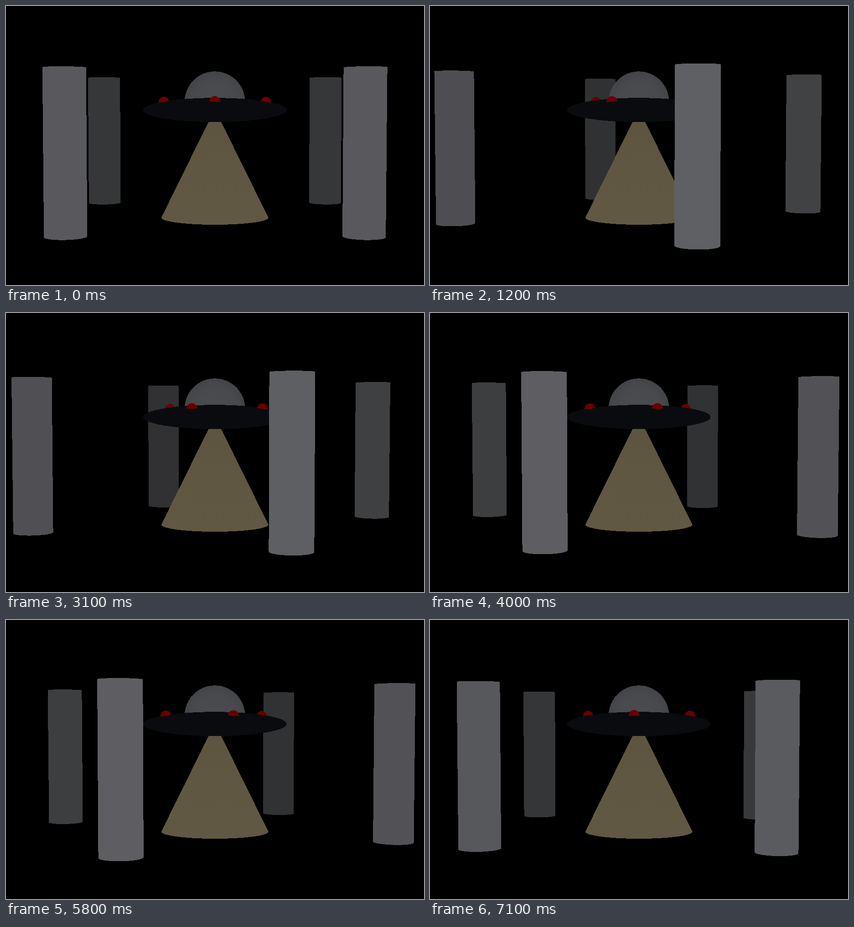
Animation, 917 px wide and 611 px high, one loop 7200 ms. Source, as an HTML page:

```html
<!DOCTYPE html>
<html lang="en">
<head>
<meta charset="utf-8">
<title>Saucer among pillars</title>
<style>
html, body { margin: 0; width: 100%; height: 100%; overflow: hidden; background: #000; }
svg { display: block; width: 100vw; height: 100vh; }
</style>
</head>
<body>
<svg viewBox="0 0 917 611" shape-rendering="crispEdges">
  <defs>
    <radialGradient id="glass" gradientUnits="userSpaceOnUse" cx="458.2" cy="209.7" r="66.4">
      <stop offset="0" stop-color="#4b4c4f"/>
      <stop offset=".75" stop-color="#48494c"/>
      <stop offset="1" stop-color="#434447"/>
    </radialGradient>
    <linearGradient id="light" x1="0" y1="0" x2="0" y2="1">
      <stop offset="0" stop-color="#5c543f"/>
      <stop offset=".5" stop-color="#5f5742"/>
      <stop offset="1" stop-color="#605842"/>
    </linearGradient>
  </defs>
  <rect width="917" height="611" fill="#000"/>
  <g id="farPillars"></g>
  <g id="farLamps" fill="#680000"></g>
  <path d="M391.8 209.7A66.4 66.4 0 0 1 524.6 209.7Z" fill="url(#glass)"/>
  <path d="M458.2 226L575.7 463.5A117.5 15.5 0 0 1 340.7 463.5Z" fill="url(#light)"/>
  <ellipse cx="458.2" cy="227.7" rx="157.5" ry="26.5" fill="#0a0b0f"/>
  <g id="nearLamps" fill="#680000"></g>
  <g id="nearPillars"></g>
</svg>
<script>
const LOOP = 7200, STEP = 100, RAD = Math.PI / 180;
const CX = 458.2, CY = 305.5, FOCAL = 1842.6, DIST = 1842.6, TILT = 0.04586;
const HORIZON = CY - FOCAL * TILT;
const PILLAR = { orbit: 395.3, r: 40, top: 73.2, bottom: -242.3 };
const LAMP = { orbit: 112, r: 11.3, y: 11 };

const layer = id => document.getElementById(id);
const [farPillars, farLamps, nearLamps, nearPillars] =
  ['farPillars', 'farLamps', 'nearLamps', 'nearPillars'].map(layer);
const makePaths = () => Array.from({ length: 4 }, () =>
  document.createElementNS('http://www.w3.org/2000/svg', 'path'));
const pillars = makePaths(), lamps = makePaths();

// y is the height above the eye, z points towards the viewer
function project(x, y, z) {
  const d = DIST - z, k = y / d;
  const scale = FOCAL / (d * (1 - k * TILT));
  return [CX + x * scale, CY - FOCAL * (k + TILT) / (1 - k * TILT)];
}

function pillarPath(x, z) {
  const { r, top, bottom } = PILLAR, n = 24;
  const facing = Math.atan2(-x, DIST - z);
  const half = Math.acos(r / Math.hypot(x, DIST - z));
  const rim = (y, dir) => Array.from({ length: n + 1 }, (_, i) => {
    const a = facing + dir * half * (2 * i / n - 1);
    const [px, py] = project(x + r * Math.sin(a), y, z + r * Math.cos(a));
    return px.toFixed(2) + ' ' + py.toFixed(2);
  });
  return 'M' + [...rim(top, 1), ...rim(bottom, -1)].join('L') + 'Z';
}

function pillarColor(z) {
  const v = 95 - 0.0616 * (382 - z);
  return `rgb(${[v, v + 0.7, v + 2 + (v - 48) * 0.06].map(Math.round)})`;
}

function drawPillars(turn) {
  pillars
    .map((el, i) => {
      const a = turn + (45 + 90 * i) * RAD;
      return { el, x: PILLAR.orbit * Math.sin(a), z: PILLAR.orbit * Math.cos(a) };
    })
    .sort((p, q) => p.z - q.z)
    .forEach(({ el, x, z }) => {
      el.setAttribute('d', pillarPath(x, z));
      el.setAttribute('fill', pillarColor(z));
      (z < 0 ? farPillars : nearPillars).append(el);
    });
}

function drawLamps(turn) {
  lamps.forEach((el, i) => {
    const a = turn + 90 * i * RAD, s = Math.sin(a), c = Math.cos(a);
    const near = c > -0.05;
    const x = LAMP.orbit * s, z = LAMP.orbit * c;
    const scale = FOCAL / (DIST - z), r = LAMP.r * scale;
    const px = CX + x * scale, py = HORIZON - LAMP.y * scale;
    const low = near ? 0.1 + 0.7 * Math.abs(c) : r;
    const lean = near ? Math.atan(0.172 * s) / RAD : 0;
    el.setAttribute('d', `M${-r} 0A${r} ${r} 0 0 1 ${r} 0A${r} ${low} 0 0 1 ${-r} 0Z`);
    el.setAttribute('transform', `translate(${px} ${py}) rotate(${lean})`);
    (near ? nearLamps : farLamps).append(el);
  });
}

function draw(ms) {
  const step = Math.floor((ms % LOOP) / STEP);
  const turn = step * 360 * STEP / LOOP * RAD;
  drawPillars(turn);
  drawLamps(turn);
}

const start = performance.now();
function tick() {
  draw(performance.now() - start);
  requestAnimationFrame(tick);
}
tick();
</script>
</body>
</html>
```
